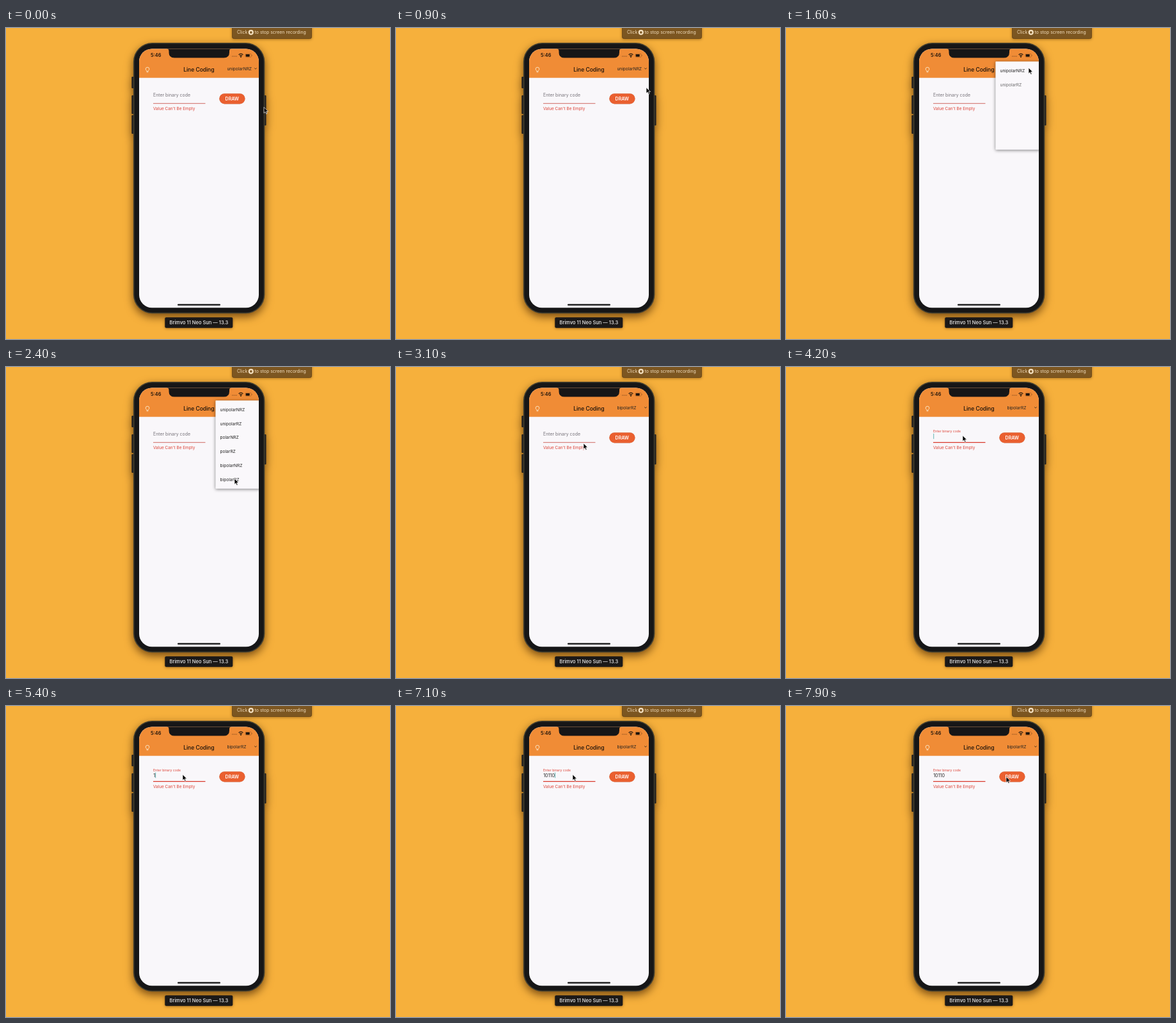
Write an HTML page that moves like this. It is 600 px wide and 485 px high and loops after 8000 ms.

```html
<!DOCTYPE html>
<html lang="en">
<head>
<meta charset="utf-8">
<title>Line coding app</title>
<style>
  html, body { margin: 0; width: 100%; height: 100%; overflow: hidden; background: #f6b03c; }
  svg { display: block; width: 600px; height: 485px; font-family: Inter, Roboto, sans-serif; }
  .shadow { filter: drop-shadow(0 5px 7px rgba(70, 35, 0, .72)); }
  .tag { filter: drop-shadow(0 1px 2px rgba(70, 35, 0, .45)); }
  .menu { filter: drop-shadow(0 1.5px 2.5px rgba(0, 0, 0, .5)); }
  .item { font-size: 6.6px; fill: #222; }
</style>
</head>
<body>
<svg viewBox="0 0 600 485">
  <defs>
    <clipPath id="glass"><rect x="208" y="32.5" width="187" height="403.7" rx="20"/></clipPath>
  </defs>

  <g class="tag">
    <rect x="353.4" y="-6" width="124.2" height="22.6" rx="3" fill="#7c5621" stroke="#5c3e14" stroke-width=".8"/>
  </g>
  <g font-size="6.95" fill="#f3dfbf">
    <text x="361" y="9.3">Click</text>
    <text x="388.6" y="9.3">to stop screen recording</text>
    <circle cx="382.8" cy="6.8" r="4.1"/>
    <rect x="381.2" y="5.2" width="3.2" height="3.2" rx=".7" fill="#7c5621"/>
  </g>

  <g class="shadow">
    <g fill="#232120">
      <rect x="196.3" y="76" width="5" height="18" rx="1"/>
      <rect x="196.3" y="105" width="5" height="29" rx="1"/>
      <rect x="196.3" y="136" width="5" height="29" rx="1"/>
      <rect x="401.5" y="105" width="5" height="47" rx="1"/>
    </g>
    <rect x="199.7" y="23.7" width="203.8" height="420.8" rx="29" fill="#161617" stroke="#45402f" stroke-width="1.6"/>
  </g>

  <g clip-path="url(#glass)">
    <rect x="208" y="32" width="187" height="405" fill="#f9f7fa"/>
    <rect x="208" y="32" width="187" height="45.7" fill="#f08c36"/>
    <path d="M251 32Q254.5 32.5 254.5 36V38Q254.5 46.5 263 46.5H340.5Q349 46.5 349 38V36Q349 32.5 352.5 32Z" fill="#161617"/>

    <text x="226" y="45.4" font-size="7.3" font-weight="600" fill="#1c130c">5:46</text>
    <path d="M353 44.2h8" stroke="#9b5a25" stroke-width="1.3" stroke-dasharray="1.3 .9"/>
    <g fill="none" stroke="#1c130c" stroke-width="1.2">
      <path d="M363.6 41.8Q367 38.6 370.4 41.8M365.1 43.5Q367 41.8 368.9 43.5"/>
      <circle cx="367" cy="44.9" r=".4"/>
      <rect x="374" y="40.2" width="9.2" height="5.2" rx="1.3" stroke="#a15d26" stroke-width=".6"/>
    </g>
    <rect x="374.7" y="40.9" width="6" height="3.8" rx=".7" fill="#1c130c"/>
    <path d="M384.3 41.9v1.8" stroke="#a15d26" stroke-width=".7"/>

    <g fill="none" stroke="#fde6c6" stroke-width=".9">
      <path d="M219.7 66.7Q218.2 65.6 218.2 64A2.8 2.8 0 0 1 223.8 64Q223.8 65.6 222.3 66.7V67.4H219.7Z"/>
      <path d="M219.7 68.8h2.6"/>
    </g>
    <text x="277.2" y="68.1" font-size="8.65" font-weight="500" letter-spacing="-.08" fill="#1c130c">Line Coding</text>
    <text id="choice" class="item" x="345.4" y="65.5"></text>
    <path d="M388.2 62.4l1.7 1.6 1.7-1.6" fill="none" stroke="#40301f" stroke-width=".9"/>

    <text id="label" x="230"></text>
    <text id="value" x="230.2" y="110.7" font-size="7.2" fill="#222"></text>
    <rect id="caret" y="103.8" width=".9" height="8.4" fill="#35a3a0"/>
    <path id="line" d="M230 117.7h81.5"/>
    <text x="230" y="127.6" font-size="6.42" fill="#dd4337">Value Can't Be Empty</text>

    <rect x="333.3" y="102.2" width="40.2" height="16.2" rx="8.1" fill="#ea6030" style="filter:drop-shadow(0 .5px .6px rgba(0,0,0,.25))"/>
    <text x="353.3" y="112.8" font-size="7" font-weight="600" text-anchor="middle" fill="#fff">DRAW</text>

    <g id="menu" class="menu">
      <rect id="sheet" x="327.4" y="52.3" width="70" rx=".8" fill="#faf8fb"/>
      <g id="items"></g>
    </g>
    <rect x="268" y="430.5" width="67" height="2.3" rx="1.15" fill="#111"/>
  </g>

  <g class="tag">
    <rect x="248.3" y="451.2" width="106" height="16.6" rx="2" fill="#1b1918"/>
  </g>
  <text x="301.4" y="462.4" font-size="7.5" font-weight="500" text-anchor="middle" fill="#eee">Brimvo 11 Neo Sun — 13.3</text>

  <path id="pointer" d="M0 0V9.2L2.1 7.2 3.6 10.5 5.1 9.8 3.7 6.6H6.6Z" stroke="#fff" stroke-width=".7" stroke-linejoin="round"/>
</svg>

<script>
const LOOP = 8000, STEP = 100;
const OPEN = 1390, PICK = 2400, FOCUS = 3800;
const codes = ['unipolarNRZ', 'unipolarRZ', 'polarNRZ', 'polarRZ', 'bipolarNRZ', 'bipolarRZ'];
const digits = '10110';
const keyTimes = [5300, 5700, 6200, 6600, 7000];
// time, x, y of the pointer tip
const route = [
  [0, 403, 123.5], [500, 403, 123.5], [1300, 379, 62], [1700, 379, 62],
  [2200, 357, 174], [2500, 357, 174], [3100, 293, 119], [3400, 276, 106.8],
  [7500, 276, 106.8], [7900, 344, 110.3], [8000, 344, 110.3]
];

const el = id => document.getElementById(id);
const clamp = v => Math.min(1, Math.max(0, v));
const ease = v => v * v * (3 - 2 * v);
const mix = (a, b, p) => a + (b - a) * p;
const set = (id, attrs) => {
  for (const name in attrs) el(id).setAttribute(name, attrs[name]);
};

const rows = codes.map((code, i) => {
  const row = document.createElementNS('http://www.w3.org/2000/svg', 'text');
  row.textContent = code;
  row.setAttribute('class', 'item');
  row.setAttribute('x', 334.5);
  row.setAttribute('y', 69.1 + i * 21.68);
  el('items').append(row);
  return row;
});

function drawPointer(t) {
  const i = route.findIndex(stop => stop[0] > t);
  const [t0, x0, y0] = route[i - 1], [t1, x1, y1] = route[i];
  const p = ease((t - t0) / (t1 - t0));
  set('pointer', { transform: `translate(${mix(x0, x1, p)} ${mix(y0, y1, p)})` });
}

function drawMenu(t) {
  const p = clamp((t - OPEN) / 300);
  const fade = clamp(p * 4) * (1 - clamp((t - PICK) / 150));
  set('menu', { opacity: fade });
  set('sheet', { height: mix(24, 137.4, clamp((p - .25) * 4)) });
  // rows appear one after another once the sheet is full size
  const unit = .5 / (codes.length + 1.5);
  rows.forEach((row, i) => {
    const shown = i ? clamp((p - .5 - (i + 1) * unit) / (1.5 * unit)) : 1;
    row.setAttribute('opacity', shown);
  });
  el('choice').textContent = codes[t < PICK ? 0 : 5];
}

function drawField(t) {
  const p = ease(clamp((t - FOCUS) / 200));
  const focused = t >= FOCUS;
  el('label').textContent = 'Enter binary code';
  set('label', {
    y: mix(107, 101.6, p),
    'font-size': mix(6.95, 5.15, p),
    fill: focused ? '#dd4337' : '#77737a'
  });
  set('line', {
    stroke: focused ? '#d93a2c' : '#c4463c',
    'stroke-width': focused ? 1.2 : .8
  });
  const typed = keyTimes.filter(k => k <= t).length;
  el('value').textContent = digits.slice(0, typed);
  const since = t - (typed ? keyTimes[typed - 1] : FOCUS);
  const width = typed ? el('value').getComputedTextLength() : 0;
  set('caret', {
    x: 230.3 + width,
    opacity: focused && since % 1000 < 500 ? .85 : 0
  });
}

function frame(now) {
  const t = Math.floor((now % LOOP) / STEP) * STEP;
  drawPointer(t);
  drawMenu(t);
  drawField(t);
  requestAnimationFrame(frame);
}

const start = performance.now();
const tick = () => frame(Math.max(0, performance.now() - start));
requestAnimationFrame(function run() {
  const t = Math.floor(((performance.now() - start) % LOOP) / STEP) * STEP;
  drawPointer(t);
  drawMenu(t);
  drawField(t);
  requestAnimationFrame(run);
});
</script>
</body>
</html>
```
